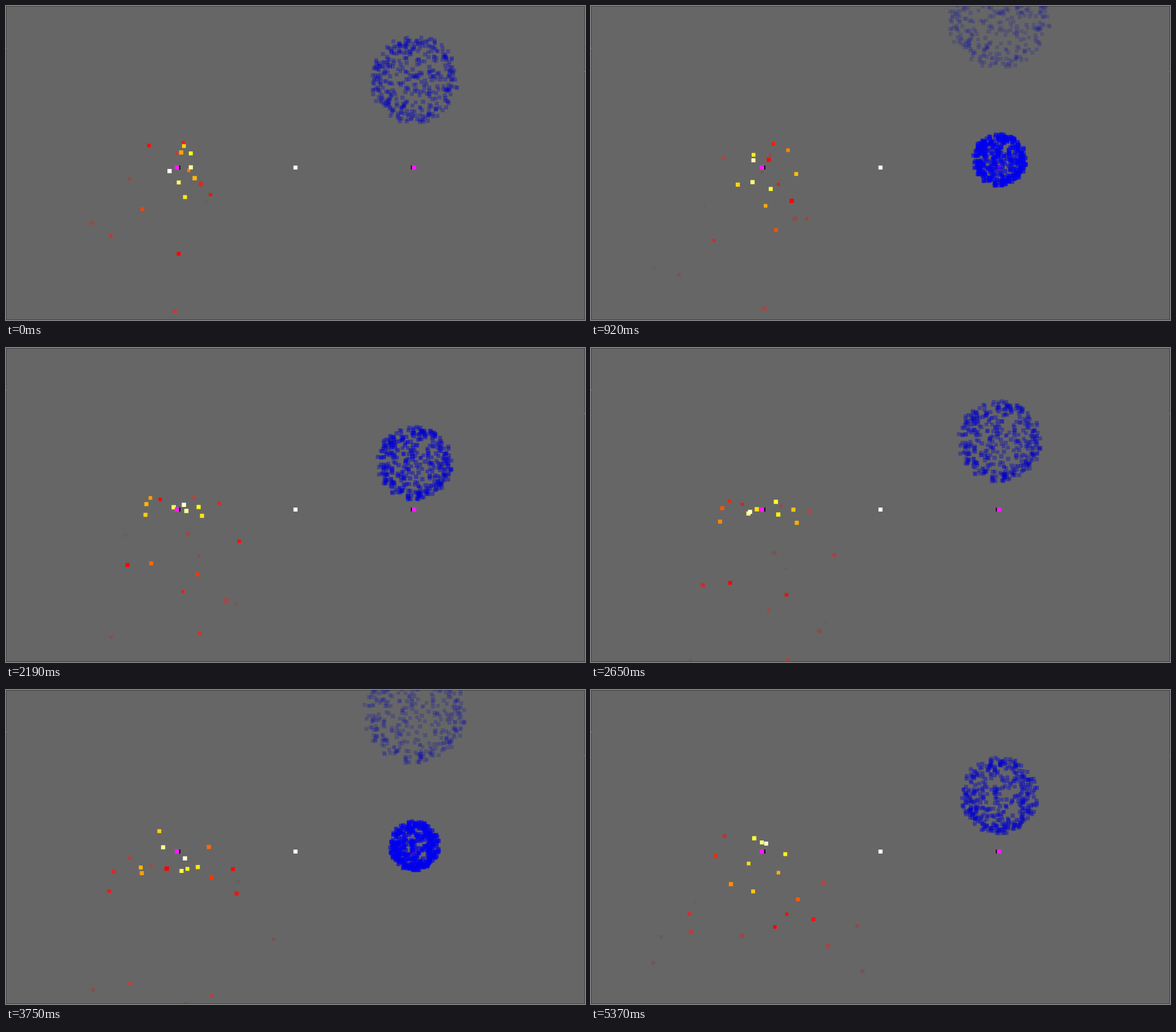
An HTML page with a canvas that plays this animation: 1016x551 px, repeating every 5440 ms.

```html
<!DOCTYPE html>
<html lang="en">
<head>
<meta charset="utf-8">
<title>Particle emitters</title>
<style>
  html, body { margin: 0; width: 100%; height: 100%; overflow: hidden; background: #666; }
  canvas { display: block; }
</style>
</head>
<body>
<canvas id="stage" width="1016" height="551"></canvas>
<script>
const ctx = document.getElementById('stage').getContext('2d');
const LOOP = 5.44;
const LEFT = 300, MIDDLE = 508, RIGHT = 716, GROUND = 283.5;

const SPARK = {
  first: -4.535, every: 0.195, count: 51, life: 4.9, fade: 2.8,
  speed: 39, headStart: 0.38, gravity: 20.3, depth: 0.07
};
// Age in seconds, then red, green and blue.
const SPARK_COLORS = [
  [0, 255, 255, 255], [0.65, 255, 255, 20], [1.45, 255, 160, 0],
  [2.05, 255, 0, 0], [3.3, 255, 35, 35], [4.9, 60, 50, 50]
];

const BURST = {
  first: -2.97, every: 2.99, waves: 3, count: 400, life: 5,
  radius: 32, growth: 14.6, lift: 35, opacity: 0.75
};

function randomizer(seed) {
  let state = seed;
  return () => (state = (state * 16807) % 2147483647) / 2147483647;
}

function randomDirection(random) {
  const z = random() * 2 - 1;
  const angle = random() * Math.PI * 2;
  const ring = Math.sqrt(1 - z * z);
  return { x: ring * Math.cos(angle), y: ring * Math.sin(angle), z };
}

const sparkRandom = randomizer(90210);
const sparks = Array.from({ length: SPARK.count }, (_, i) => ({
  ...randomDirection(sparkRandom),
  birth: SPARK.first + i * SPARK.every
}));

// Each burst is a thick, slightly ragged shell.
function makeBurst(_, wave) {
  const random = randomizer(48271 + 7919 * wave);
  const points = Array.from({ length: BURST.count }, () => ({
    ...randomDirection(random),
    reach: 0.84 + 0.2 * random()
  }));
  return { points, birth: BURST.first + wave * BURST.every };
}
const bursts = Array.from({ length: BURST.waves }, makeBurst);

function square(x, y, size, color) {
  ctx.fillStyle = color;
  ctx.fillRect(x - size / 2, y - size / 2, size, size);
}

function sparkColor(age) {
  const next = Math.max(1, SPARK_COLORS.findIndex(key => key[0] >= age));
  const [t0, ...from] = SPARK_COLORS[next - 1];
  const [t1, ...to] = SPARK_COLORS[next];
  const mix = (age - t0) / (t1 - t0);
  return `rgb(${from.map((c, i) => Math.round(c + (to[i] - c) * mix))})`;
}

function drawSparks(time) {
  for (const spark of sparks) {
    const age = time - spark.birth;
    if (age < 0 || age >= SPARK.life) continue;
    const travel = age + SPARK.headStart;
    const scale = 1 / (1 - SPARK.depth * spark.z * travel);
    const dx = SPARK.speed * spark.x * travel;
    const dy = SPARK.speed * spark.y * travel + SPARK.gravity / 2 * age * age;
    ctx.globalAlpha = Math.min(1, (SPARK.life - age) / SPARK.fade);
    square(LEFT + dx * scale, GROUND + dy * scale, (7.3 - 0.4 * age) * scale, sparkColor(age));
  }
  ctx.globalAlpha = 1;
}

function drawBursts(time) {
  for (const { points, birth } of bursts) {
    const age = time - birth;
    if (age < 0 || age >= BURST.life) continue;
    const radius = BURST.radius + BURST.growth * age;
    const centerY = GROUND - BURST.lift / 2 * age * age;
    const color = `rgb(0,0,${Math.round(255 - 20 * age)})`;
    ctx.globalAlpha = BURST.opacity * (1 - age / BURST.life);
    for (const p of points) {
      const distance = radius * p.reach;
      square(RIGHT + 1 + p.x * distance, centerY + p.y * distance, 7.4 - 0.15 * age + 0.6 * p.z, color);
    }
  }
  ctx.globalAlpha = 1;
}

function drawBackdrop() {
  ctx.fillStyle = '#666';
  ctx.fillRect(0, 0, 1016, 551);
  ctx.strokeStyle = '#444';
  ctx.strokeRect(0.5, 0.5, 1015, 550);
  square(0.5, 74, 1, '#aaa');
  square(1015.5, 115, 1, '#aaa');
}

function draw(now) {
  const time = now / 1000 % LOOP;
  drawBackdrop();
  square(LEFT + 2.5, GROUND, 7, '#000');
  square(RIGHT - 2, GROUND, 7, '#000');
  square(MIDDLE, GROUND, 7, '#fff');
  drawSparks(time);
  square(LEFT, GROUND, 7.6, '#ff1aff');
  square(RIGHT, GROUND, 7.6, '#ff1aff');
  drawBursts(time);
}

let start;
function tick(now) {
  start ??= now;
  draw(now - start);
  requestAnimationFrame(tick);
}
draw(0);
requestAnimationFrame(tick);
</script>
</body>
</html>
```
